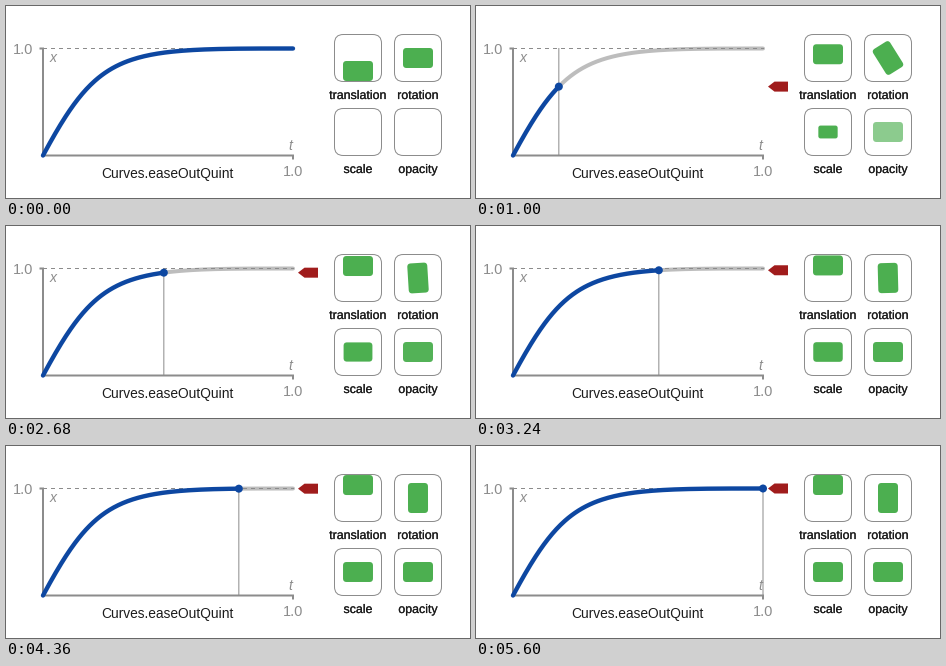
A matplotlib script that plays this animation: 464 by 192 pixels, repeating every 5.62 s.

```python
import numpy as np
import matplotlib.pyplot as plt
from matplotlib import patheffects
from matplotlib.animation import FuncAnimation
from matplotlib.patches import Circle, FancyBboxPatch, Polygon
from matplotlib.transforms import Affine2D

W, H, DPI = 464, 192, 64
PX = 72 / DPI  # points per pixel
TICK, TICKS, STEPS = 20, 281, 120

BLUE, GREEN, RED = "#0d47a1", "#4caf50", "#a01c1c"
AXIS, REST, INK = "#8c8c8c", "#bdbdbd", "#1c1c1c"
LEFT, RIGHT, TOP, BOTTOM = 37, 287, 42.5, 149.5

plt.rcParams["font.family"] = "Liberation Sans"
fig = plt.figure(figsize=(W / DPI, H / DPI), dpi=DPI, facecolor="white")
ax = fig.add_axes([0, 0, 1, 1])
ax.set(xlim=(0, W), ylim=(H, 0))
ax.axis("off")

# Cubic easing curve with control points (0.23, 1) and (0.32, 1)
S = np.linspace(0, 1, 1001)


def bezier(s, a, b):
    return 3 * a * s * (1 - s) ** 2 + 3 * b * s**2 * (1 - s) + s**3


def curve_param(t):
    return np.interp(t, bezier(S, 0.23, 0.32), S)


def curve_points(s0, s1):
    s = np.linspace(s0, s1, 150)
    x = LEFT + (RIGHT - LEFT) * bezier(s, 0.23, 0.32)
    y = BOTTOM + (TOP - BOTTOM) * bezier(s, 1, 1)
    return x, y


def line(xs, ys, color, width, z, **kw):
    return ax.plot(xs, ys, color=color, lw=width * PX, zorder=z, snap=False,
                   **kw)[0]


def label(x, y, s, size, color, weight=0, **kw):
    text = ax.text(x, y, s, fontsize=size * PX, color=color, ha="center",
                   va="baseline", zorder=5, **kw)
    if weight:
        text.set_path_effects([
            patheffects.withStroke(linewidth=weight * PX, foreground=color)])


def round_box(x, y, w, h, r, **kw):
    style = f"round,pad=0,rounding_size={r}"
    return ax.add_patch(FancyBboxPatch((x, y), w, h, boxstyle=style, **kw))


def tile():
    return round_box(-15, -10, 30, 20, 3.5, fc=GREEN, ec="none", zorder=3)


def place(patch, x, y, angle=0, scale=1):
    move = Affine2D().scale(scale).rotate_deg(angle).translate(x, y)
    patch.set_transform(move + ax.transData)


# Axes and labels
line([33.5, LEFT, LEFT, RIGHT, RIGHT], [TOP, TOP, BOTTOM, BOTTOM, 153.5],
     AXIS, 2, 1, solid_joinstyle="miter", solid_capstyle="butt")
line([LEFT, RIGHT + 1], [TOP, TOP], AXIS, 1, 3, dashes=(4, 4))
label(16.7, 47.5, "1.0", 14.6, AXIS)
label(287, 170.5, "1.0", 14.6, AXIS)
label(47, 56, "x", 14, AXIS, style="italic")
label(283.8, 144, "t", 14, AXIS, style="italic")
label(161.8, 172, "Curves.easeOutQuint", 13.75, INK)

for cx, cy, name in [(352, 52, "translation"), (412, 52, "rotation"),
                     (352, 126, "scale"), (412, 126, "opacity")]:
    round_box(cx - 23.5, cy - 23.5, 47, 47, 8.8, fc="none", ec=AXIS, lw=PX,
              zorder=2)
    label(cx, cy + 41, name, 12.4, INK, 0.2)

# Moving parts
rest = line([], [], REST, 4, 2, solid_capstyle="round")
done = line([], [], BLUE, 4.4, 4, solid_capstyle="round")
cursor = line([], [], AXIS, 1, 3.5)
dot = ax.add_patch(Circle((0, 0), 4, fc=BLUE, ec="none", zorder=6))
arrow = ax.add_patch(Polygon([(0, 0)] * 3, fc=RED, ec="none", zorder=4))
shift, spin, grow, fade = (tile() for _ in range(4))


def step_at(tick):
    # Steps last 20, 100 and 20 ms in turn
    k, r = divmod(tick, 7)
    return 3 * k + (r > 0) + (r == 6)


def update(tick):
    t = step_at(tick) / STEPS
    s = curve_param(t)
    v = bezier(s, 1, 1)
    x, y = LEFT + (RIGHT - LEFT) * t, BOTTOM + (TOP - BOTTOM) * v

    running = t > 0
    for part in (rest, cursor, dot, arrow, grow, fade):
        part.set_visible(running)
    done.set_data(*curve_points(0, s if running else 1))
    rest.set_data(*curve_points(s, 1))
    cursor.set_data([x, x], [TOP, BOTTOM])
    dot.center = x, y
    arrow.set_xy([(292, y), (298.5, y - 5), (312, y - 5),
                  (312, y + 5), (298.5, y + 5)])

    place(shift, 352, 65 - 26 * v)
    place(spin, 412, 52, angle=90 * v)
    place(grow, 352, 126, scale=max(v, 0.01))
    place(fade, 412, 126)
    fade.set_alpha(min(v, 1))
    return []


anim = FuncAnimation(fig, update, frames=TICKS, interval=TICK, repeat=True,
                     repeat_delay=0, blit=False)
plt.show()
```
